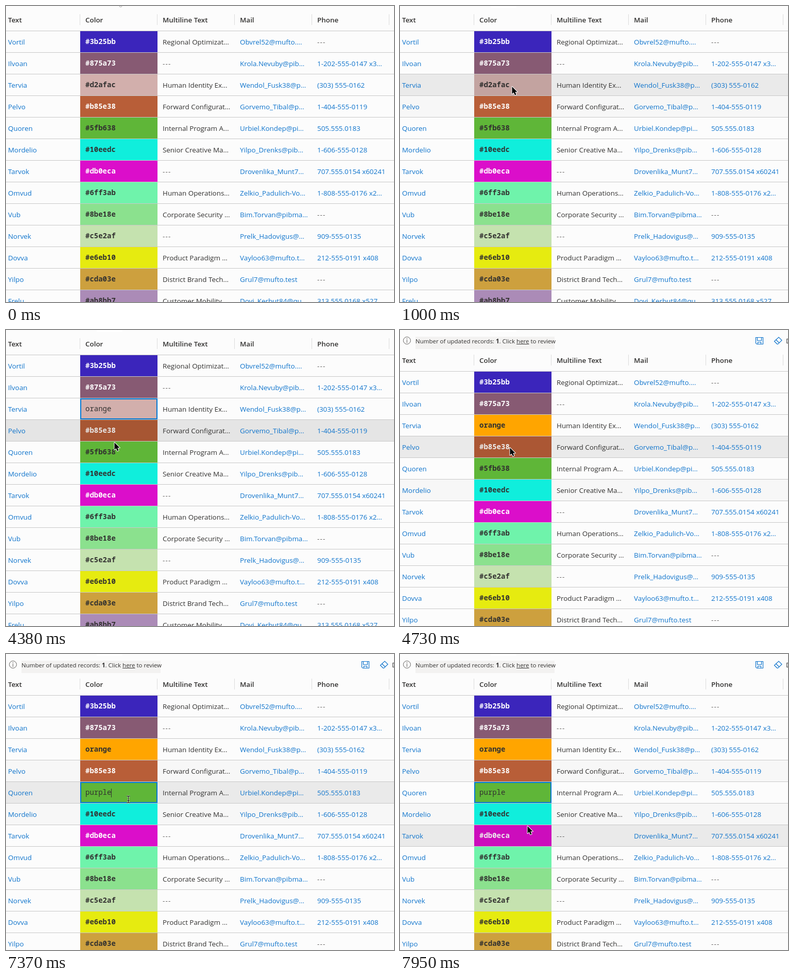
An HTML page with a canvas that plays this animation: 753x576 px, repeating every 8000 ms.

```html
<!DOCTYPE html>
<html lang="en">
<head>
<meta charset="utf-8">
<title>Editable grid</title>
<style>
  html, body { margin: 0; width: 100%; height: 100%; overflow: hidden; background: #fcfcfc; }
  canvas { display: block; }
</style>
</head>
<body>
<canvas id="stage" width="753" height="576"></canvas>
<script>
const ctx = document.getElementById('stage').getContext('2d');
const W = 753, H = 576, LOOP = 8000, ROW = 42, STEP = 58;
const SANS = '"Open Sans", sans-serif', MONO = '"Noto Sans Mono", monospace';
const BODY = '13.4px ' + SANS, BOLD = '600 13.4px ' + SANS;
const INK = '#323130', BLUE = '#0f74cc', PAPER = '#fcfcfc';
const COLS = [4, 154, 304, 454, 604];
const HEADS = ['Text', 'Color', 'Multiline Text', 'Mail', 'Phone'];
const LIGHT_TEXT = [0, 1, 3, 6];

const ROWS = [
  ['Vortil', '#3b25bb', 'Regional Optimizat…', 'Obvrel52@mufto.…', '---'],
  ['Ilvoan', '#875a73', '---', 'Krola.Nevuby@pib…', '1-202-555-0147 x3…'],
  ['Tervia', '#d2afac', 'Human Identity Ex…', 'Wendol_Fusk38@p…', '(303) 555-0162'],
  ['Pelvo', '#b85e38', 'Forward Configurat…', 'Gorvemo_Tibal@p…', '1-404-555-0119'],
  ['Quoren', '#5fb638', 'Internal Program A…', 'Urbiel.Kondep@pi…', '505.555.0183'],
  ['Mordelio', '#10eedc', 'Senior Creative Ma…', 'Yilpo_Drenks@pib…', '1-606-555-0128'],
  ['Tarvok', '#db0eca', '---', 'Drovenlika_Munt7…', '707.555.0154 x60241'],
  ['Omvud', '#6ff3ab', 'Human Operations…', 'Zelkio_Padulich-Vo…', '1-808-555-0176 x2…'],
  ['Vub', '#8be18e', 'Corporate Security …', 'Bim.Torvan@pibma…', '---'],
  ['Norvek', '#c5e2af', '---', 'Prelk_Hadovigus@…', '909-555-0135'],
  ['Dovva', '#e6eb10', 'Product Paradigm …', 'Vayloo63@mufto.t…', '212-555-0191 x408'],
  ['Yilpo', '#cda03e', 'District Brand Tech…', 'Grul7@mufto.test', '---'],
  ['Frelu', '#ab8bb7', 'Customer Mobility …', 'Dovi_Kerbut84@qu…', '313.555.0168 x527']
];

// Pointer path: time, x, y
const PATH = [
  [0, 222, -18], [90, 222, -18], [400, 209, 184], [640, 212, 153], [882, 212, 153],
  [940, 215, 155], [1000, 217, 157], [4040, 217, 157], [4380, 210, 219],
  [4500, 211, 224], [4790, 214, 232], [4962, 214, 232], [5310, 231, 266],
  [7312, 231, 266], [7370, 236, 282], [7720, 249, 386], [7950, 247, 335], [LOOP, 247, 335]
];

// Cell edits: open, focus (caret), select all, key times, blur, commit
const EDITS = [
  { row: 2, open: 1420, focus: 1660, select: 2130, word: 'orange',
    keys: [3150, 3210, 3320, 3620, 3680, 3740], blur: 4040, commit: 4500 },
  { row: 4, open: 5310, focus: 5730, select: 5970, word: 'purple',
    keys: [6500, 6740, 6790, 6970, 7050, 7140], blur: 7428, commit: LOOP + 1 }
];
const SHIFT_AT = 4500;

function pointerAt(t) {
  let i = 0;
  while (i < PATH.length - 2 && t >= PATH[i + 1][0]) i++;
  const [t0, x0, y0] = PATH[i], [t1, x1, y1] = PATH[i + 1];
  const held = Math.floor(Math.max(0, t - t0) / STEP) * STEP;
  const u = Math.min(1, held / (t1 - t0)), e = u * u * (3 - 2 * u);
  return { x: x0 + (x1 - x0) * e, y: y0 + (y1 - y0) * e };
}

function box(x, y, w, h, fill) {
  ctx.fillStyle = fill;
  ctx.fillRect(x, y, w, h);
}

function label(str, x, y, font, fill) {
  ctx.font = font;
  ctx.fillStyle = fill;
  ctx.letterSpacing = str === '---' ? '1.2px' : '0px';
  ctx.fillText(str, x, y);
  const w = ctx.measureText(str).width;
  ctx.letterSpacing = '0px';
  return w;
}

function line(color, width, ...points) {
  ctx.strokeStyle = color;
  ctx.lineWidth = width;
  ctx.beginPath();
  points.forEach(([x, y], i) => i ? ctx.lineTo(x, y) : ctx.moveTo(x, y));
  ctx.stroke();
}

function drawEditor(edit, t, y) {
  const typed = edit.keys.filter(k => t >= k).length;
  const str = typed ? edit.word.slice(0, typed) : ROWS[edit.row][1];
  const active = t >= edit.focus && t < edit.blur;
  if (active && t >= edit.select && !typed) box(154, y + 11, 59, 19, '#b4d5fe');
  const weight = t < edit.focus ? 600 : 500;
  const w = label(str, 154, y + 25, weight + ' 14px ' + MONO, INK);
  if (active && (typed || t < edit.select)) box(Math.round(154 + w), y + 13, 1, 17, INK);
  ctx.strokeStyle = '#0078d4';
  ctx.lineWidth = 2;
  ctx.strokeRect(145, y + 1, 148, 39);
}

function drawRow(i, y, t, hovered) {
  const [name, hex, title, mail, phone] = ROWS[i];
  const edit = EDITS.find(e => e.row === i);
  const editing = edit && t >= edit.open && t < edit.commit;
  const done = edit && t >= edit.commit;
  const shade = hovered ? (i === 3 && t < SHIFT_AT && t > 4000 ? 0.09 : 0.07) : 0;
  const visited = (i === 3 && t >= 400) || (i === 5 && t >= SHIFT_AT);
  if (shade) box(0, y, W, 41, `rgba(0,0,0,${shade})`);
  else if (visited) box(0, y, W, 41, '#f7f7f7');

  box(144, y, 150, 41, done ? '#ffa500' : hex);
  if (editing) {
    drawEditor(edit, t, y);
  } else {
    const ink = LIGHT_TEXT.includes(i) ? '#fff' : INK;
    label(done ? edit.word : hex, 154, y + 25, '600 14px ' + MONO, ink);
    if (shade) box(144, y, 150, 41, `rgba(0,0,0,${shade})`);
  }

  label(name, COLS[0], y + 26, BODY, BLUE);
  label(title, COLS[2], y + 26, BODY, title === '---' ? '#605e5c' : INK);
  label(mail, COLS[3], y + 26, BODY, BLUE);
  label(phone, COLS[4], y + 26, BODY, phone === '---' ? '#605e5c' : BLUE);
  box(0, y + 41, W, 1, '#c8c8c8');
}

function drawHeader(top) {
  HEADS.forEach((head, i) => {
    label(head, COLS[i], top + 32, BOLD, INK);
    box(143 + i * 150, top + 16, 1, 21, '#dcdcdc');
  });
  box(0, top + 48, W, 1, '#c8c8c8');
}

function drawMessage() {
  box(30, 13, 270, 24, '#f3f2f1');
  ctx.strokeStyle = '#605e5c';
  ctx.lineWidth = 1;
  ctx.beginPath();
  ctx.arc(13.5, 20.5, 7, 0, Math.PI * 2);
  ctx.stroke();
  box(13, 19, 1, 6, '#605e5c');
  box(13, 16, 1, 2, '#605e5c');

  let x = 30;
  const say = (str, weight) => x += label(str, x, 26, `${weight} 11.5px ${SANS}`, INK);
  say('Number of updated records: ', 400);
  say('1', 700);
  say('. Click ', 400);
  const from = x;
  say('here', 400);
  box(from, 27, x - from, 1, INK);
  say(' to review', 400);

  // save
  line(BLUE, 1.2, [690.5, 14.5], [704.5, 14.5], [704.5, 27.5], [692.5, 27.5], [690.5, 25.5], [690.5, 14]);
  line(BLUE, 1.2, [693.5, 14.5], [693.5, 20.5], [701.5, 20.5], [701.5, 14.5]);
  line(BLUE, 1.2, [694.5, 27.5], [694.5, 23.5], [700.5, 23.5], [700.5, 27.5]);
  // eraser
  line(BLUE, 1.2, [732, 27.5], [726.5, 22], [735, 14], [741, 20], [733.5, 27.5], [731.5, 27.5]);
  line(BLUE, 1.2, [729.5, 19], [736, 25]);
  label('Discard', 749, 26, BODY, INK);
}

function drawArrow(x, y) {
  ctx.beginPath();
  [[0, 0], [0, 14], [3.2, 11.2], [5.6, 16.4], [8, 15.3], [5.8, 10.2], [10.2, 10.2]]
    .forEach(([dx, dy]) => ctx.lineTo(x + 0.5 + dx, y + dy));
  ctx.closePath();
  ctx.lineJoin = 'round';
  ctx.strokeStyle = '#fff';
  ctx.lineWidth = 2;
  ctx.stroke();
  ctx.fillStyle = '#000';
  ctx.fill();
  ctx.lineJoin = 'miter';
}

function drawBeam(px, py) {
  const x = Math.round(px) + 1.5, y = Math.round(py) + 1;
  for (const [color, width] of [['rgba(255,255,255,.6)', 2.6], ['#111', 1.1]]) {
    line(color, width, [x - 3.5, y - 6.5], [x - 1, y - 6.5], [x, y - 5.5], [x + 1, y - 6.5], [x + 3.5, y - 6.5]);
    line(color, width, [x, y - 5.5], [x, y + 5.5]);
    line(color, width, [x - 3.5, y + 6.5], [x - 1, y + 6.5], [x, y + 5.5], [x + 1, y + 6.5], [x + 3.5, y + 6.5]);
    line(color, width, [x - 2, y + 2.5], [x + 2, y + 2.5]);
  }
}

function draw(t) {
  const top = t >= SHIFT_AT ? 32 : 0;
  box(0, 0, W, H, PAPER);
  if (t >= 90) {
    box(176, 0, 50, 4, '#fff');
  } else {
    ctx.strokeStyle = '#a5a5a5';
    ctx.lineWidth = 1;
    ctx.beginPath();
    ctx.arc(222.5, -0.5, 2.5, 0, Math.PI);
    ctx.stroke();
  }
  if (top) drawMessage();
  drawHeader(top);

  // the row highlight trails the pointer by one step
  const hover = Math.floor((pointerAt(Math.max(0, t - 60)).y - top - 49) / ROW);
  ROWS.forEach((_, i) => drawRow(i, top + 49 + i * ROW, t, i === hover));

  const p = pointerAt(t);
  const beam = EDITS.some(e => t >= e.focus && t < e.blur);
  (beam ? drawBeam : drawArrow)(p.x, p.y);
}

const start = performance.now();
function tick() {
  draw((performance.now() - start) % LOOP);
  requestAnimationFrame(tick);
}
tick();
</script>
</body>
</html>
```
